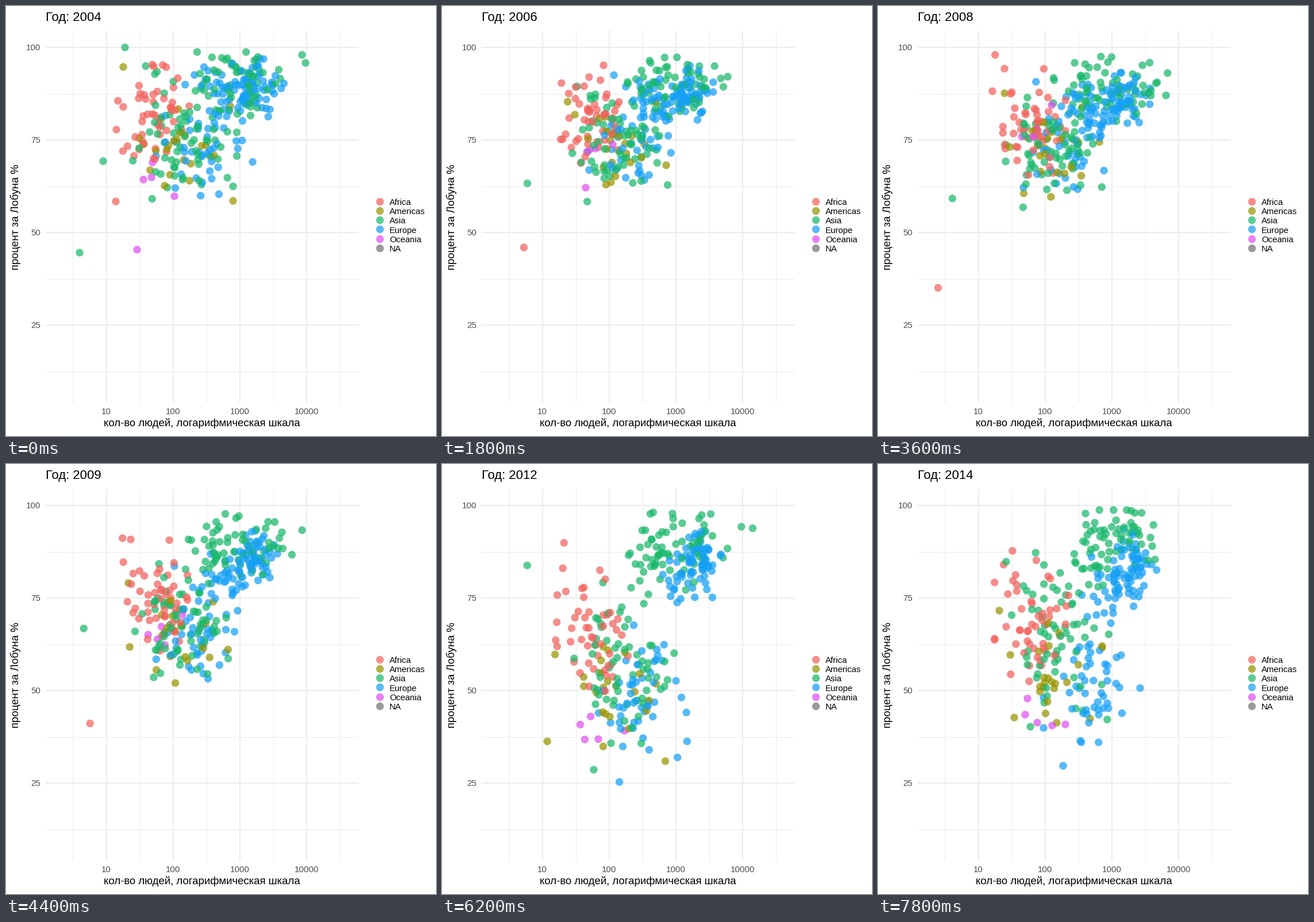
These frames come from a looping animation (748 by 748 pixels, 8000 ms). A matplotlib script:

```python
import numpy as np
import matplotlib.pyplot as plt
from matplotlib.animation import FuncAnimation

SIZE, DPI = 748, 100
FRAMES, INTERVAL = 40, 200
PX = 72 / DPI  # points per pixel
ALPHA = 0.72

COLORS = {
    "Africa": "#f2625d",
    "Americas": "#989400",
    "Asia": "#1ab86b",
    "Europe": "#16a0f5",
    "Oceania": "#e050f0",
    "NA": "#747474",
}

# Steps at which positions are known; movement in between is linear.
KEYS = [0, 16, 32, 38]

# continent, count, x spread, then (x, y, y spread) at every key
GROUPS = [
    ("Europe", 55, 24, (433, 142, 24), (425, 160, 21), (447, 158, 21), (438, 172, 28)),
    ("Europe", 25, 24, (385, 135, 32), (372, 190, 24), (432, 205, 30), (405, 225, 35)),
    ("Europe", 48, 40, (345, 225, 50), (335, 215, 45), (352, 425, 58), (372, 375, 52)),
    ("Asia", 48, 36, (388, 135, 30), (378, 145, 27), (385, 155, 34), (398, 145, 32)),
    ("Asia", 14, 20, (435, 130, 24), (460, 140, 20), (445, 125, 24), (435, 115, 16)),
    ("Asia", 42, 34, (330, 245, 42), (325, 240, 34), (345, 370, 68), (330, 310, 64)),
    ("Asia", 20, 25, (265, 220, 55), (265, 240, 50), (275, 350, 65), (285, 270, 60)),
    ("Africa", 46, 32, (262, 190, 44), (265, 200, 46), (262, 310, 56), (270, 265, 48)),
    ("Americas", 21, 38, (310, 245, 42), (305, 240, 38), (295, 420, 46), (310, 365, 42)),
]

# Stations away from the crowd: (x, y) at every key
STATIONS = [
    ("Africa", (191, 340), (94, 500), (261, 344), (263, 378)),
    ("Africa", (260, 248), (204, 74), (200, 250), (223, 283)),
    ("Africa", (192, 215), (221, 249), (211, 121), (234, 151)),
    ("Americas", (395, 339), (385, 215), (389, 560), (369, 443)),
    ("Americas", (204, 106), (233, 227), (176, 519), (237, 441)),
    ("Americas", (240, 240), (222, 138), (193, 359), (211, 255)),
    ("Asia", (169, 270), (128, 347), (151, 152), (223, 170)),
    ("Asia", (128, 429), (408, 149), (372, 160), (377, 102)),
    ("Asia", (469, 135), (501, 117), (546, 111), (479, 106)),
    ("Asia", (515, 85), (351, 145), (545, 104), (474, 128)),
    ("Asia", (521, 99), (473, 147), (500, 147), (482, 166)),
    ("Asia", (207, 72), (263, 208), (264, 578), (265, 457)),
    ("Europe", (355, 250), (355, 240), (302, 598), (322, 525)),
    ("Oceania", (228, 424), (272, 208), (245, 518), (256, 436)),
    ("Oceania", (239, 302), (277, 196), (256, 474), (260, 408)),
    ("Oceania", (253, 298), (251, 210), (239, 488), (277, 450)),
    ("Oceania", (255, 272), (279, 224), (271, 515), (303, 455)),
    ("Oceania", (293, 331), (301, 150), (320, 509), (326, 453)),
]


def x_of(count):
    return 58.4 + 116.15 * np.log10(count)


def y_of(percent):
    return 716 - 6.44 * percent


def spread(rng, n):
    """Normal scores per key, correlated along each station's track."""
    own = rng.standard_normal((1, n))
    fresh = rng.standard_normal((len(KEYS), n))
    return np.clip(0.8 * own + 0.6 * fresh, -2.1, 2.1)


def build():
    rng = np.random.default_rng(12)
    tracks, colors = [], []
    for name, n, sx, *keys in GROUPS:
        mx, my, sy = np.array(keys, float).T[:, :, None]
        x = mx + sx * spread(rng, n)
        y = np.maximum(my + sy * spread(rng, n), 80)
        tracks.append(np.stack([x, y], axis=-1))
        colors += [COLORS[name]] * n
    for name, *keys in STATIONS:
        tracks.append(np.array(keys, float)[:, None])
        colors.append(COLORS[name])
    tracks = np.concatenate(tracks, axis=1)
    order = rng.permutation(len(colors))
    return tracks[:, order], [colors[i] for i in order]


def position(step):
    k = min(np.searchsorted(KEYS, step, side="right") - 1, len(KEYS) - 2)
    f = (step - KEYS[k]) / (KEYS[k + 1] - KEYS[k])
    return (1 - f) * tracks[k] + f * tracks[k + 1]


plt.rcParams["font.family"] = "Liberation Sans"
fig = plt.figure(figsize=(SIZE / DPI, SIZE / DPI), dpi=DPI, facecolor="white")
ax = fig.add_axes([0, 0, 1, 1])
ax.set_xlim(0, SIZE)
ax.set_ylim(SIZE, 0)
ax.axis("off")


def label(x, y, text, px, color="black", ha="left", **kw):
    return ax.text(x, y, text, fontsize=px * PX, color=color, ha=ha,
                   va="baseline", **kw)


def grid(xs, ys, px):
    style = dict(color="#ebebeb", lw=px * PX, zorder=1)
    ax.vlines(xs, 42.5, 690, **style)
    ax.hlines(ys, 69, 613.5, **style)


counts = np.array([10, 100, 1000, 10000])
percents = np.array([25, 50, 75, 100])
grid(x_of(10 ** np.arange(0.5, 5)), y_of(percents - 12.5), 1.05)
grid(x_of(counts), y_of(percents), 2.0)

for c in counts:
    label(x_of(c), 710.5, str(c), 15, "#4d4d4d", "center")
for p in percents:
    label(60.5, y_of(p) + 5.4, str(p), 15, "#4d4d4d", "right")

label(341, 731, "кол-во людей, логарифмическая шкала", 18.7, ha="center")
label(22.5, 367, "процент за Лобуна %", 18.7, ha="center",
      rotation=90, rotation_mode="anchor")
title = label(69, 26, "", 22.2)

DOT = dict(s=(13.4 * PX) ** 2, alpha=ALPHA, linewidths=0, zorder=3)
for i, (name, color) in enumerate(COLORS.items()):
    y = 339.7 + 16.2 * i
    ax.scatter(649.7, y, color=color, **DOT)
    label(667, y + 6.2, name, 14.9)

tracks, colors = build()
dots = ax.scatter(*tracks[0].T, c=colors, **DOT)


def update(frame):
    step = max(frame - 1, 0)
    dots.set_offsets(position(step))
    title.set_text(f"Год: {round(2004 + step / 4)}")
    return dots, title


anim = FuncAnimation(fig, update, frames=FRAMES, interval=INTERVAL,
                     init_func=lambda: update(0), repeat=True, repeat_delay=0)
plt.show()
```
